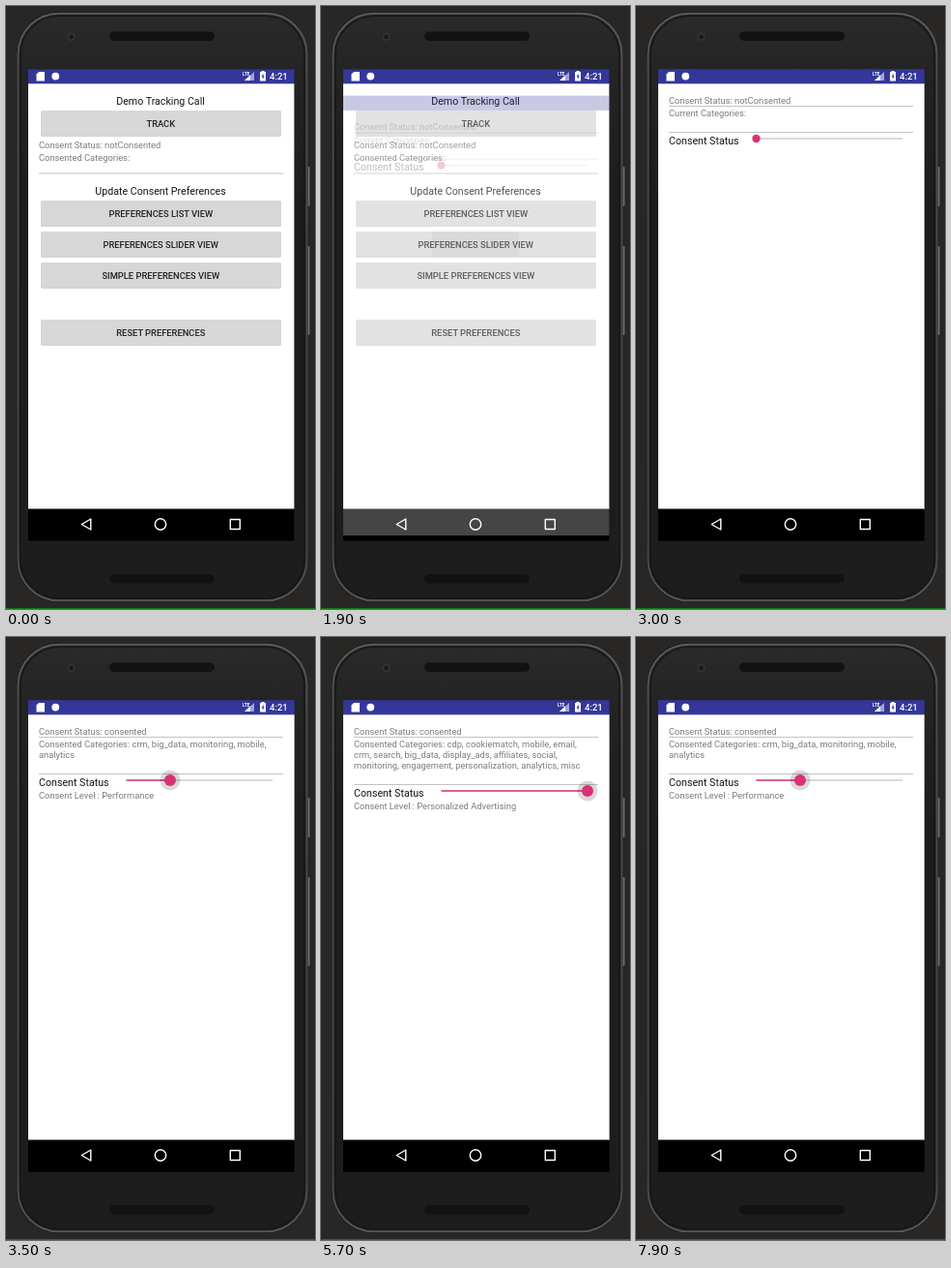
An HTML page that plays this animation: 320 by 623 pixels, repeating every 8000 ms.

```html
<!DOCTYPE html>
<html lang="en">
<head>
<meta charset="utf-8">
<title>Consent slider demo</title>
<style>
  html, body { margin: 0; width: 100%; height: 100%; overflow: hidden; background: #282726; }
  svg { display: block; width: 320px; height: 623px; font-family: Roboto, "Noto Sans", sans-serif; }
  .title { font-size: 10.67px; fill: #151515; }
  .small { font-size: 9.33px; fill: #7b7b7b; }
  .button { font-size: 9.33px; font-weight: 500; fill: #222; }
  .mid { text-anchor: middle; }
  .rule { stroke: #c2c4c2; stroke-width: 1.2; }
</style>
</head>
<body>
<svg viewBox="0 0 320 623">
  <defs>
    <clipPath id="screen"><rect x="23" y="65.5" width="275.4" height="487"/></clipPath>
    <clipPath id="pressed"><rect x="36" y="233" width="249" height="26" rx="1.5"/></clipPath>
    <linearGradient id="rim" x1="0" y1="0" x2="0" y2="1">
      <stop offset="0" stop-color="#5c5b5a"/>
      <stop offset=".12" stop-color="#4b4a49"/>
      <stop offset=".9" stop-color="#454443"/>
      <stop offset="1" stop-color="#575655"/>
    </linearGradient>
    <linearGradient id="body" x1="0" y1="0" x2="0" y2="1">
      <stop offset="0" stop-color="#2a2a2a"/>
      <stop offset=".1" stop-color="#242424"/>
      <stop offset=".3" stop-color="#1d1d1d"/>
    </linearGradient>
    <g id="window">
      <rect x="22" y="80" width="278" height="440" fill="#fff"/>
      <rect x="22" y="65" width="278" height="15.3" fill="#343799"/>
      <rect x="22" y="519.5" width="278" height="34"/>
    </g>
  </defs>

  <!-- phone -->
  <rect width="320" height="623" fill="#282726"/>
  <rect y="622" width="320" height="1" fill="#0a7a12"/>
  <rect x="311.5" y="166" width="3" height="41" rx="1.2" fill="#6d6c6b"/>
  <rect x="311.5" y="248" width="3" height="92" rx="1.2" fill="#6d6c6b"/>
  <rect x="11" y="6" width="301.5" height="610" rx="43" fill="#161616"/>
  <rect x="12.5" y="7.7" width="299" height="606.6" rx="42" fill="url(#body)" stroke="url(#rim)" stroke-width="2"/>
  <rect x="15" y="10.2" width="294" height="601.6" rx="40" fill="none" stroke="#171717" stroke-width="1.5"/>
  <rect x="107" y="26.5" width="109" height="9.5" rx="4.7" fill="#121212"/>
  <rect x="107" y="587" width="109" height="9.5" rx="4.7" fill="#121212"/>
  <circle cx="67.5" cy="32" r="4.2" fill="#333"/>
  <circle cx="67.5" cy="32" r="2.4" fill="#1a1a1a"/>

  <g clip-path="url(#screen)">
    <g id="home">
      <use href="#window"/>
      <text class="title mid" x="160" y="101.7">Demo Tracking Call</text>
      <text class="small" x="34" y="147.3">Consent Status: notConsented</text>
      <text class="small" x="34" y="160.2">Consented Categories:</text>
      <path class="rule" d="M34 173H287"/>
      <text class="title mid" x="160" y="194.6">Update Consent Preferences</text>
      <g id="buttons"></g>
      <circle id="ripple" cx="160" cy="246" fill="#000" fill-opacity=".05" clip-path="url(#pressed)"/>
    </g>
    <g id="panel">
      <use href="#window"/>
      <text id="status" class="small" x="34" y="100.7"></text>
      <path class="rule" d="M34 103.5H287"/>
      <g id="lines"></g>
      <g id="control">
        <path class="rule" d="M34 130.5H287"/>
        <text class="title" x="34" y="142.6">Consent Status</text>
        <path d="M124.5 137H276" stroke="#cfcfcf" stroke-width="1.3"/>
        <path id="fill" stroke="#dc3a7b" stroke-width="1.5"/>
        <circle id="halo" cy="137" fill="#000" fill-opacity=".15"/>
        <circle id="thumb" cy="137" fill="#db3075"/>
        <text id="level" class="small" x="34" y="155.8"></text>
      </g>
    </g>
  </g>

  <!-- system icons -->
  <g fill="#fff">
    <path d="M34 68H40V77.5H31.5V70.5Z"/>
    <circle cx="51.3" cy="72.6" r="3.9"/>
    <text x="245" y="71.8" font-size="4.6" font-weight="700">LTE</text>
    <path d="M257 68V77H247Z" fill-opacity=".55"/>
    <path d="M253 71.6V77H247Z"/>
    <path d="M264.5 68V67H267.5V68H269V77.5H263V68Z"/>
    <path d="M266.6 69.5L264.6 73.3H265.8V76L267.6 72.3H266.5Z" fill="#343799"/>
    <text x="273" y="76.2" font-size="9.5" font-weight="500">4:21</text>
  </g>
  <g fill="none" stroke="#fff" stroke-width="1.4" stroke-linejoin="round">
    <path d="M87.8 530V541L78.3 535.5Z"/>
    <circle cx="160" cy="535.5" r="5.7"/>
    <rect x="232.3" y="530.5" width="10" height="10"/>
  </g>
</svg>

<script>
const LOOP = 8000, STEP = 100;
const OPEN = 1880, SLIDE = 300, FADE = 74, RISE = 39;
const TRACK_X = 124.5, TRACK_W = 151.5, LINE_H = 11;
const $ = id => document.getElementById(id);

const LEVELS = {
  off: { at: 0, lines: ["Current Categories:"] },
  performance: {
    at: .3, name: "Performance",
    lines: ["Consented Categories: crm, big_data, monitoring, mobile,", "analytics"]
  },
  marketing: {
    at: .65, name: "Marketing",
    lines: ["Consented Categories: cdp, mobile, email, crm, search,",
      "big_data, affiliates, monitoring, engagement, analytics"]
  },
  full: {
    at: 1, name: "Personalized Advertising",
    lines: ["Consented Categories: cdp, cookiematch, mobile, email,",
      "crm, search, big_data, display_ads, affiliates, social,",
      "monitoring, engagement, personalization, analytics, misc"]
  }
};

// start time, level
const STATES = [
  [0, "off"],
  [3100, "performance"],
  [4800, "marketing"],
  [5500, "full"],
  [6600, "marketing"],
  [7400, "performance"]
];

const BUTTONS = [
  [108, "TRACK"],
  [201, "PREFERENCES LIST VIEW"],
  [233, "PREFERENCES SLIDER VIEW"],
  [265, "SIMPLE PREFERENCES VIEW"],
  [324, "RESET PREFERENCES"]
];

$("buttons").innerHTML = BUTTONS.map(([y, label]) =>
  `<rect x="36" y="${y + .8}" width="249" height="26" rx="1.5" fill="#c4c4c4"/>
   <rect x="36" y="${y}" width="249" height="26" rx="1.5" fill="#d7d7d7"/>
   <text class="button mid" x="160.3" y="${y + 16.5}">${label}</text>`).join("");

let shown;
function showLevel(key) {
  if (key === shown) return;
  shown = key;
  const { at, name, lines } = LEVELS[key];
  const x = TRACK_X + TRACK_W * at;
  $("status").textContent = "Consent Status: " + (name ? "consented" : "notConsented");
  $("lines").innerHTML = lines.map((line, i) =>
    `<text class="small" x="34" y="${114.3 + i * LINE_H}">${line}</text>`).join("");
  $("level").textContent = name ? "Consent Level : " + name : "";
  $("control").setAttribute("transform", `translate(0 ${(lines.length - 1) * LINE_H})`);
  $("fill").setAttribute("d", `M${TRACK_X} 137H${x}`);
  $("halo").setAttribute("cx", x);
  $("halo").setAttribute("r", name ? 10.5 : 0);
  $("thumb").setAttribute("cx", x);
  $("thumb").setAttribute("r", name ? 6 : 4.2);
}

const clamp = v => Math.min(1, Math.max(0, v));

function render(t) {
  const left = 1 - clamp((t - OPEN) / SLIDE);
  $("panel").setAttribute("transform", `translate(0 ${RISE * left ** 5})`);
  $("panel").setAttribute("opacity", clamp((t - OPEN) / FADE));
  $("ripple").setAttribute("r", t < 1700 ? 0 : 14 + 32 * clamp((t - 1700) / 200));
  showLevel(STATES.findLast(([start]) => t >= start)[1]);
}

function tick() {
  const t = performance.now() % LOOP;
  render(Math.floor(t / STEP) * STEP);
  requestAnimationFrame(tick);
}
tick();
</script>
</body>
</html>
```
